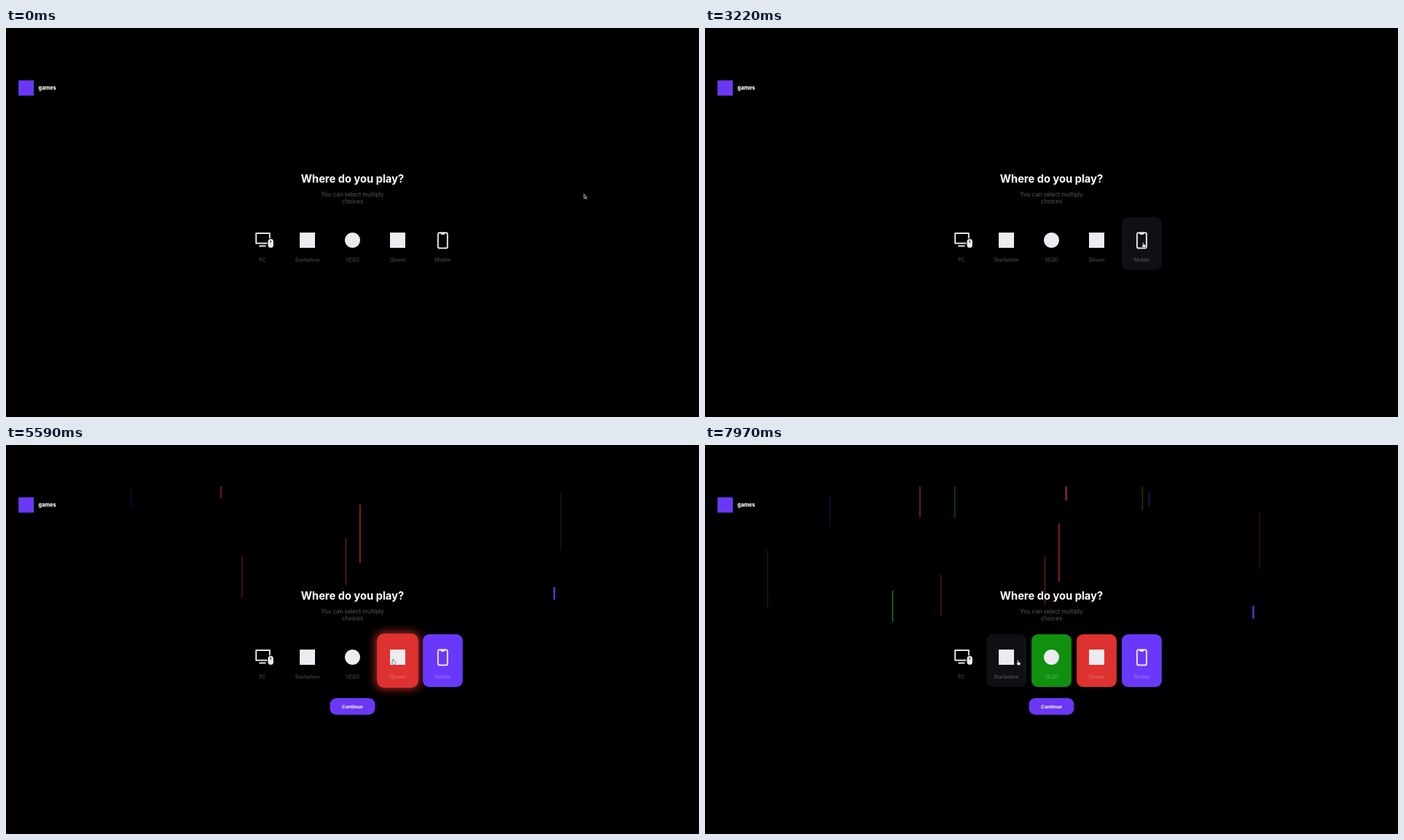
Recreate the animation shown at these times as an HTML page. Size 998 px wide and 561 px high, loop 8000 ms.

```html
<!DOCTYPE html>
<html lang="en">
<head>
<meta charset="utf-8">
<title>Where do you play?</title>
<style>
html, body { margin: 0; width: 100%; height: 100%; overflow: hidden; background: #000; }
svg { display: block; width: 100%; height: 100%; font-family: Inter, sans-serif; }
text { text-anchor: middle; fill: #fff; }
.label { font-size: 7px; fill-opacity: .33; }
.sub { font-size: 8.3px; fill: #58585c; }
.icon { fill: #ebebf0; stroke: none; }
.line { fill: none; stroke: #ebebf0; stroke-width: 2; stroke-linejoin: round; }
</style>
</head>
<body>
<svg viewBox="0 0 998 561">
  <defs>
    <filter id="blur" x="-50%" y="-50%" width="200%" height="200%"><feGaussianBlur stdDeviation="7"/></filter>
    <clipPath id="page"><rect y="60" width="998" height="442"/></clipPath>
  </defs>
  <g id="rain" clip-path="url(#page)"></g>
  <rect x="18" y="75.5" width="22" height="22" fill="#6a38f5"/>
  <text x="59.5" y="88.7" font-size="7.6" font-weight="800">games</text>
  <text x="499" y="223" font-size="15.4" font-weight="700" fill="#f4f4f6">Where do you play?</text>
  <text class="sub" x="499" y="243">You can select multiply</text>
  <text class="sub" x="499" y="253">choices</text>
  <g id="cards"></g>
  <g id="button">
    <rect x="466.5" y="365" width="65" height="24" rx="9" fill="#6a38f5"/>
    <text x="499" y="379.5" font-size="6.8" font-weight="700">Continue</text>
  </g>
  <g id="pointer">
    <path id="arrow" d="M.3 .4V6.8L1.8 5.4 2.9 7.7 3.8 7.3 2.8 5H4.7z" fill="#111" stroke="#e8e8e8" stroke-width=".75"/>
    <path id="hand" transform="translate(.8 4)" d="M-1.5 0V-3.2a.7.7 0 0 1 1.4 0V-1l2.2.5q1 .3.9 1.2L2.6 3.6H-.8L-3 .9q.5-.9 1.5 0z" fill="#f2f2f2" stroke="#222" stroke-width=".5"/>
  </g>
</svg>
<script>
const LOOP = 8000;
const $ = id => document.getElementById(id);
const add = (parent, tag, attrs) => {
  const el = document.createElementNS('http://www.w3.org/2000/svg', tag);
  for (const key in attrs) el.setAttribute(key, attrs[key]);
  return parent.appendChild(el);
};
const ramp = (t, start, span) => Math.min(1, Math.max(0, (t - start) / span));

// Linear interpolation through rows of [time, value, ...]
const track = (rows, t, col = 1) => {
  let i = 1;
  while (i < rows.length - 1 && rows[i][0] < t) i++;
  const a = rows[i - 1], b = rows[i];
  return a[col] + (b[col] - a[col]) * (t - a[0]) / (b[0] - a[0]);
};

const path = [
  [0, 832, 239], [230, 832, 239], [1030, 796, 246], [1130, 796, 246],
  [1930, 691, 289], [2030, 691, 289], [2270, 667, 303], [2830, 631, 309],
  [3900, 631, 309], [4500, 570, 309], [4700, 570, 309], [4900, 557.5, 308.5],
  [5650, 557.5, 308.5], [6150, 507, 309.5], [6900, 507, 309.5],
  [7500, 450.5, 310], [8000, 450.5, 310]
];
const fall = [[3460, -2.8], [3710, 0], [4670, 10.5], [5590, 21], [6640, 36], [8000, 48.3]];

const NEVER = 1e5;
const cards = [
  { name: 'PC', x: 369, icon: `
    <path class="line" d="M360.2 296h19.6v14.6h-19.6z"/>
    <path class="line" d="M364.5 314.4H374"/>
    <rect x="377.3" y="304.2" width="7.8" height="12.6" rx="3.9" class="icon" style="stroke:#000;stroke-width:2;paint-order:stroke"/>
    <path d="M381.2 306.5v3" stroke="#000" stroke-width="1.1"/>` },
  { name: 'Starlantine', x: 434, enter: 7370, icon: '<path class="icon" d="M423 295h22v22h-22z"/>' },
  { name: 'VEQO', x: 499, color: '#10900f', enter: 5945, click: 6200, leave: 7293,
    icon: '<circle class="icon" cx="499" cy="306" r="11"/>' },
  { name: 'Glivem', x: 564, color: '#dd3230', enter: 4277, click: 4900, leave: 5870,
    icon: '<path class="icon" d="M553 295h22v22h-22z"/>' },
  { name: 'Mobile', x: 629, color: '#6a38fa', enter: 2410, click: 3460, leave: 4205, icon: `
    <rect class="line" x="622.2" y="295.2" width="13.6" height="22.4" rx="2.4"/>
    <path class="icon" d="M625.5 295.5h7l-1 2.6h-5z"/>` }
];
for (const c of cards) {
  const g = add($('cards'), 'g', {});
  const box = { x: c.x - 28.75, y: 273, width: 57.5, height: 76, rx: 9 };
  c.dark = add(g, 'rect', { ...box, fill: '#121118' });
  c.glow = add(g, 'rect', { ...box, x: box.x - 2, y: 271, width: 61.5, height: 80, fill: c.color || 'none', filter: 'url(#blur)' });
  c.rim = add(g, 'rect', { ...box, fill: 'none', stroke: c.color || 'none', 'stroke-width': 2 });
  c.face = add(g, 'rect', { ...box, fill: c.color || 'none' });
  add(g, 'g', {}).innerHTML = c.icon;
  add(g, 'text', { class: 'label', x: c.x, y: 337.2 }).textContent = c.name;
}

// x, top at zero fall, length, width, colour; grouped by the click that starts them
const drops = {
  3460: [[180, 25, 44, 1, '#14144e'], [789.6, 184, 18, 2.6, '#5a32d2'], [639.6, 21, 18, 1.5, '#211c78']],
  4900: [[309.6, 10, 46, 1.3, '#a82a28'], [340, 139, 60, 1.3, '#641919'], [489.5, 113, 68, 1.2, '#7c2020'],
    [509.8, 65, 84, 2, '#8a2220'], [798.7, 47, 84, 1.2, '#400f0b'], [520.2, -20, 52, 2.6, '#8e2826']],
  6200: [[90.2, 104, 82, 1.2, '#0a2c1c'], [270.2, 162, 45, 1.8, '#117411'], [359.8, 0, 57.5, 1.3, '#125218'],
    [460.3, 232, 56, 2.6, '#0b540b'], [419.8, 251, 30, 1, '#06200c'], [629.8, -10, 55.5, 2, '#0d360d']]
};
const groups = Object.entries(drops).map(([start, list]) => {
  const g = add($('rain'), 'g', {});
  for (const [x, y, height, width, fill] of list) add(g, 'rect', { x: x - width / 2, y, width, height, fill });
  return { g, start: +start };
});

function draw(now) {
  const t = now % LOOP;
  const drop = track(fall, t);
  for (const { g, start } of groups) {
    g.setAttribute('transform', `translate(0 ${drop})`);
    g.setAttribute('opacity', ramp(t, start, 300));
  }
  let over = false;
  for (const { dark, glow, rim, face, enter = NEVER, click = NEVER, leave = NEVER } of cards) {
    const hover = ramp(t, enter, 250) - ramp(t, leave, 250);
    const chosen = ramp(t, click, 200);
    dark.setAttribute('opacity', hover * .9);
    face.setAttribute('opacity', chosen);
    glow.setAttribute('opacity', chosen * hover * .9);
    rim.setAttribute('opacity', chosen * hover);
    over = over || t >= enter && t < leave;
  }
  $('button').setAttribute('opacity', ramp(t, 3460, 300));
  $('pointer').setAttribute('transform', `translate(${track(path, t)} ${track(path, t, 2)})`);
  $('arrow').setAttribute('visibility', over ? 'hidden' : 'visible');
  $('hand').setAttribute('visibility', over ? 'visible' : 'hidden');
  requestAnimationFrame(draw);
}
requestAnimationFrame(draw);
</script>
</body>
</html>
```
